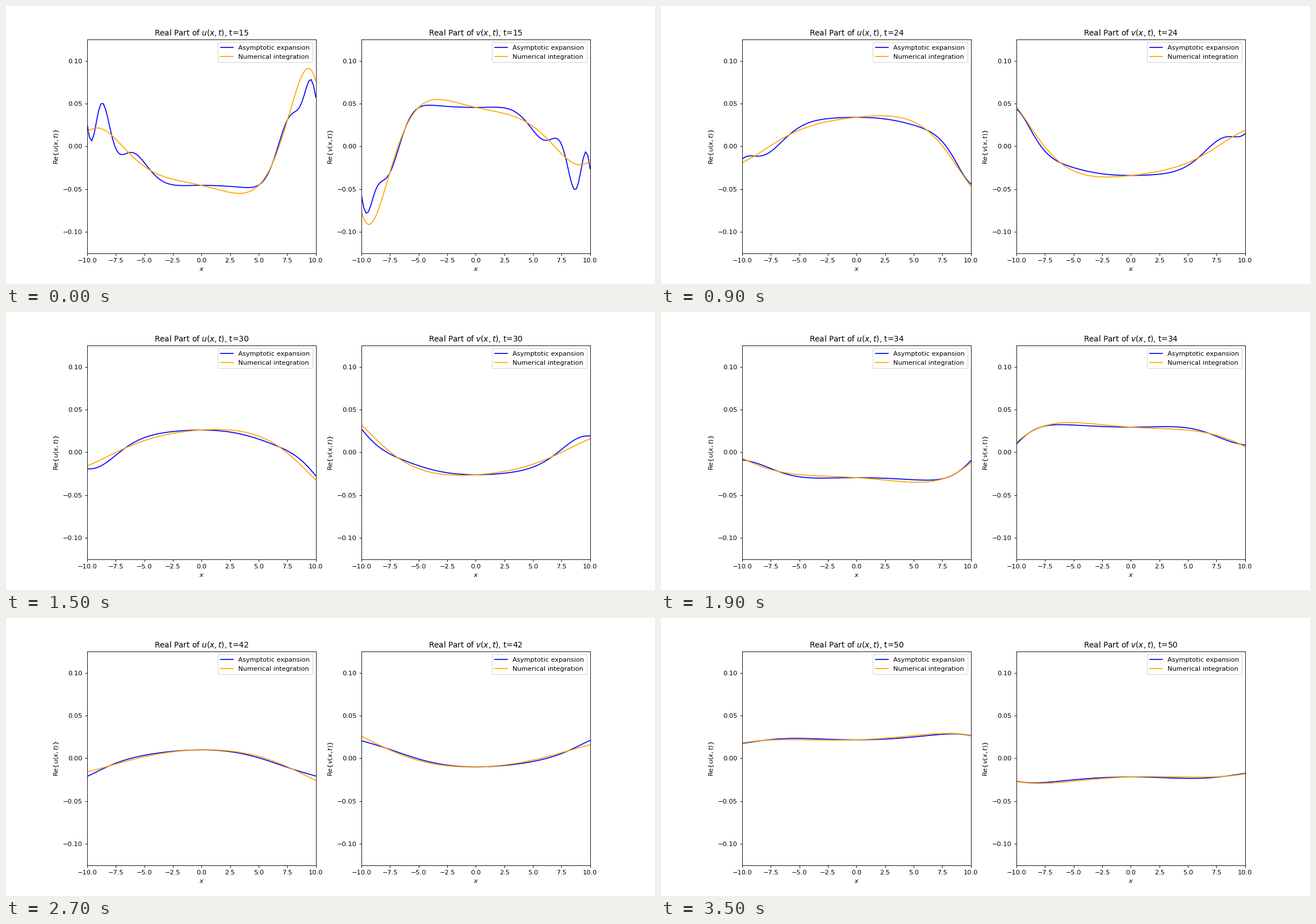
A matplotlib script for the animation above (3.6 s loop, 1143x490 px).

```python
import numpy as np
import matplotlib.pyplot as plt
from matplotlib.animation import FuncAnimation

plt.rcParams["font.family"] = "DejaVu Sans"

WIDTH, HEIGHT, DPI = 1143, 490, 81.625
T_START, T_END = 15, 50
x = np.linspace(-10, 10, 100)
k = np.linspace(-12, 12, 1201)
omega_k = np.sqrt(1 + k**2)
dk = k[1] - k[0]


def spectrum(k):
    """Fourier transform of the initial pulse exp(-x^2) / 4."""
    return np.sqrt(np.pi) / 4 * np.exp(-k**2 / 4)


cos_part = np.cos(np.outer(x, k)) * spectrum(k)
sin_part = np.sin(np.outer(x, k)) * spectrum(k) * k / omega_k


def integrated_u(t):
    total = cos_part @ np.cos(omega_k * t) + sin_part @ np.sin(omega_k * t)
    return total * dk / (2 * np.pi)


def asymptotic_u(t):
    """Stationary phase: one term for each branch of the dispersion relation."""
    tau = np.sqrt(t**2 - x**2)
    ks, omega = x / tau, t / tau
    envelope = spectrum(ks) * omega**1.5 / np.sqrt(2 * np.pi * t)
    tilt = (1 + ks) / omega
    plus = (1 + tilt) / 2 * np.cos(omega * t - ks * x + np.pi / 4)
    minus = (1 - tilt) / 2 * np.cos(omega * t + ks * x + np.pi / 4)
    return envelope * (plus + minus)


# The small margin keeps the pixel size from rounding down.
size = ((WIDTH + 1e-3) / DPI, (HEIGHT + 1e-3) / DPI)
fig, axes = plt.subplots(1, 2, figsize=size, dpi=DPI)
panels = []
for ax, name in zip(axes, "uv"):
    blue, = ax.plot(x, 0 * x, color="blue", label="Asymptotic expansion")
    orange, = ax.plot(x, 0 * x, color="orange", label="Numerical integration")
    ax.set_xlim(-10, 10)
    ax.set_ylim(-0.125, 0.125)
    ax.set_yticks(np.linspace(-0.1, 0.1, 5))
    ax.set_xlabel("$x$")
    ax.set_ylabel(f"Re{{${name}(x,t)$}}")
    ax.legend(loc="upper right")
    panels.append((ax, name, blue, orange))


def update(frame):
    t = T_START + frame
    approx, exact = asymptotic_u(t), integrated_u(t)
    for ax, name, blue, orange in panels:
        # The second field mirrors the first: v(x, t) = -u(-x, t).
        mirrored = name == "v"
        blue.set_ydata(-approx[::-1] if mirrored else approx)
        orange.set_ydata(-exact[::-1] if mirrored else exact)
        ax.set_title(f"Real Part of ${name}(x,t)$, t={t}")
    return []


anim = FuncAnimation(fig, update, frames=T_END - T_START + 1, interval=100,
                     repeat=True, repeat_delay=0, blit=False)
plt.show()
```
